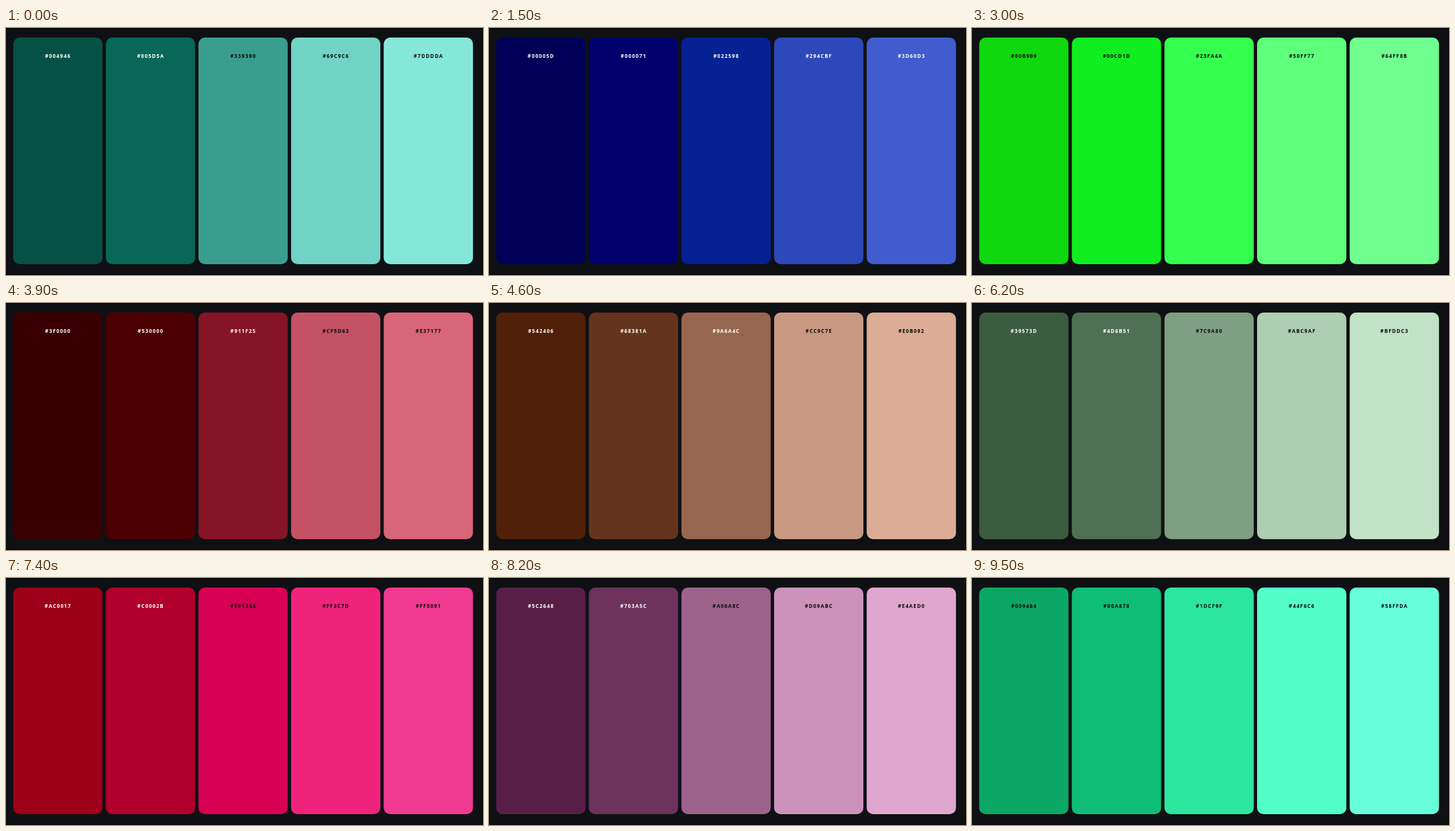
Animation, 748 px wide and 388 px high, one loop 9900 ms. Source, as an HTML page:

```html
<!DOCTYPE html>
<html lang="en">
<head>
<meta charset="utf-8">
<title>Palette generator</title>
<style>
  html, body { margin: 0; width: 100%; height: 100%; overflow: hidden; background: #0f1014; }
  svg { display: block; width: 100vw; height: 100vh; }
  text { font: 700 8px "Open Sans", "Noto Sans", sans-serif; letter-spacing: 1.15px; text-anchor: middle; }
</style>
</head>
<body>
<svg id="stage" viewBox="0 0 748 388">
  <rect width="748" height="388" fill="#0f1014"/>
  <path d="M0 .5H748M747.5 0V388M0 387H748" stroke="#000" fill="none"/>
</svg>
<script>
const LOOP = 9900;

// Each palette: start time, base colour, step between shades
const PALETTES = [
  [0, 0x339390, 54],
  [100, 0x8a7f9c, 44],
  [500, 0x7d5a86, 48],
  [1000, 0x46689e, 42],
  [1500, 0x022598, 39],
  [2000, 0x5f7f8c, 46],
  [2500, 0x8c6e96, 45],
  [3000, 0x23fa4a, 45],
  [3500, 0x3c1478, 40],
  [3900, 0x911f25, 62],
  [4500, 0x9a6a4c, 50],
  [5000, 0x8f8a58, 44],
  [5500, 0xa3b066, 41],
  [6000, 0x7c9a80, 47],
  [6600, 0x9c7f70, 52],
  [7000, 0x3c5a8c, 45],
  [7400, 0xe91354, 41],
  [8000, 0xa06a8c, 48],
  [8400, 0x5c94a0, 43],
  [9000, 0x1dcf9f, 39]
];

const stage = document.getElementById("stage");
const clamp = v => Math.max(0, Math.min(255, Math.round(v)));
const hex = rgb => "#" + rgb.map(v => v.toString(16).padStart(2, "0")).join("").toUpperCase();

function add(tag, attrs) {
  const el = document.createElementNS("http://www.w3.org/2000/svg", tag);
  for (const key in attrs) el.setAttribute(key, attrs[key]);
  return stage.appendChild(el);
}

function shades(base, step) {
  const rgb = [base >> 16, base >> 8 & 255, base & 255];
  return [-step - 20, -step, 0, step, step + 20].map(d => rgb.map(v => clamp(v + d)));
}

// Screen colour: BT.709 luma and chroma read back as BT.601
function screenColor([r, g, b]) {
  const y = 0.2126 * r + 0.7152 * g + 0.0722 * b;
  const cb = (b - y) / 1.8556, cr = (r - y) / 1.5748;
  return hex([y + 1.402 * cr, y - 0.3441 * cb - 0.7141 * cr, y + 1.772 * cb].map(clamp));
}

function inkColor(rgb) {
  const [r, g, b] = rgb.map(v => {
    v /= 255;
    return v <= 0.04045 ? v / 12.92 : ((v + 0.055) / 1.055) ** 2.4;
  });
  return 0.2126 * r + 0.7152 * g + 0.0722 * b > 0.179 ? "#0a0a0a" : "#fff";
}

const cards = Array.from({ length: 5 }, (_, i) => {
  const x = 11.3 + i * 145.25;
  return {
    panel: add("rect", { x, y: 15, width: 140, height: 356, rx: 10 }),
    label: add("text", { x: x + 70.3, y: 46.7 })
  };
});

let shown = null;

function draw(time) {
  const t = time % LOOP;
  const palette = PALETTES.findLast(p => p[0] <= t);
  if (palette === shown) return;
  shown = palette;
  shades(palette[1], palette[2]).forEach((rgb, i) => {
    cards[i].panel.setAttribute("fill", screenColor(rgb));
    cards[i].label.setAttribute("fill", inkColor(rgb));
    cards[i].label.textContent = hex(rgb);
  });
}

const start = performance.now();
function tick() {
  draw(performance.now() - start);
  requestAnimationFrame(tick);
}
tick();
</script>
</body>
</html>
```
